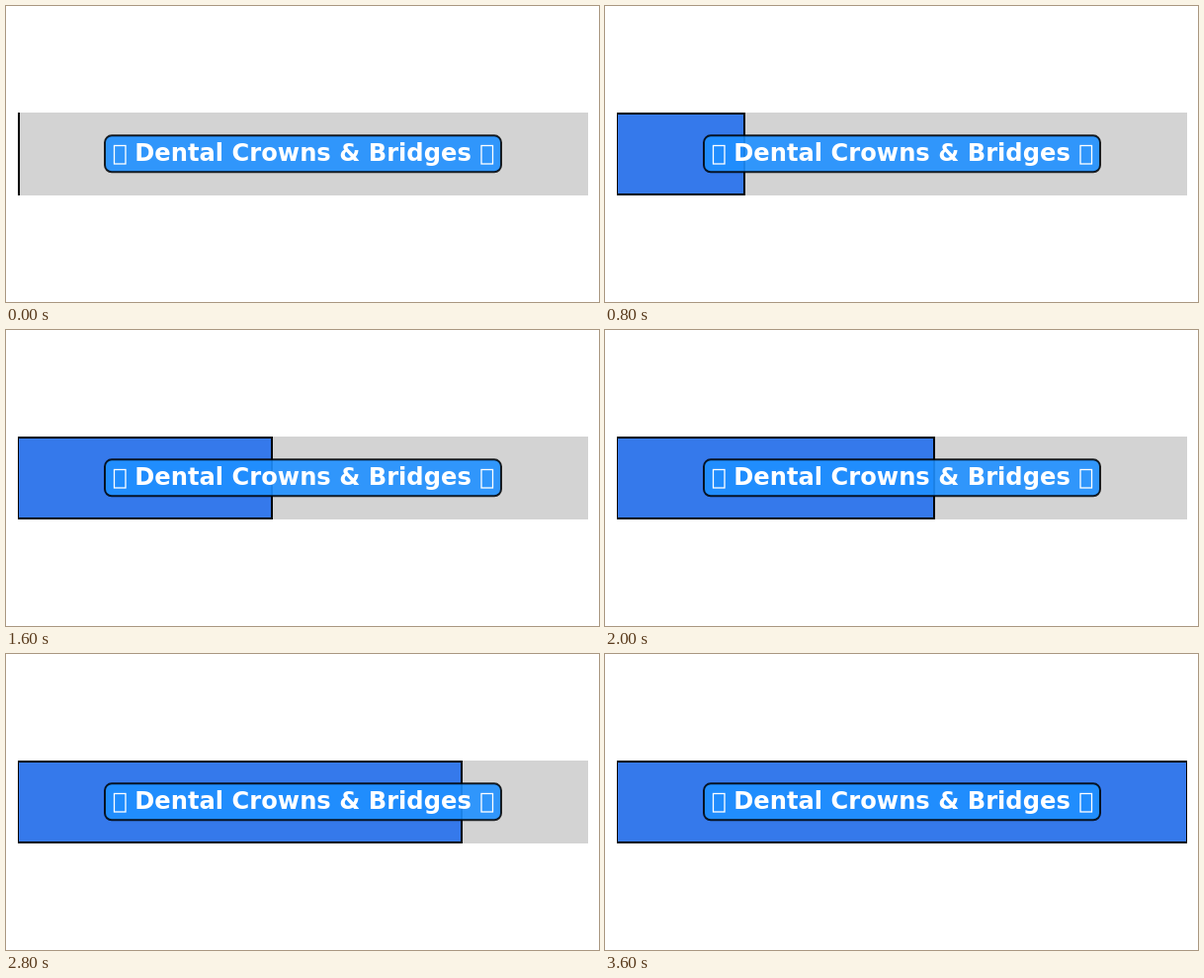
These frames come from a looping animation (600 px wide and 300 px high, 4000 ms). An HTML page:

```html
<!DOCTYPE html>
<html lang="en">
<head>
<meta charset="utf-8">
<title>Dental Crowns &amp; Bridges</title>
<style>
  html, body { margin: 0; width: 100%; height: 100%; overflow: hidden; background: #fff; }
  .stage { position: relative; width: 600px; height: 300px; overflow: hidden; }
  .track {
    position: absolute; left: 12px; top: 108px; width: 577px; height: 84px;
    overflow: hidden; background: #d3d3d3;
  }
  .track::after {
    content: ""; position: absolute; left: 0; top: 0; width: 1px; height: 100%;
    background: #000;
  }
  .bar {
    box-sizing: border-box; width: 578px; height: 84px;
    background: #3579eb; border: solid #000; border-width: 2px 2px 2px 0;
    animation: fill 4s steps(10, end) infinite;
  }
  /* ten holds, 64px apart, from empty to full */
  @keyframes fill {
    from { transform: translateX(-576px); }
    to { transform: translateX(64px); }
  }
  svg { position: absolute; left: 0; top: 0; }
  .plate { fill: #1e90ff; fill-opacity: .9; stroke: #000; stroke-opacity: .85; stroke-width: 2; }
  .glyph { fill: none; stroke: #fff; stroke-width: 1.3; }
  text { font: bold 24.2px "DejaVu Sans", sans-serif; fill: #fff; text-anchor: middle; }
</style>
</head>
<body>
<div class="stage">
  <div class="track"><div class="bar"></div></div>
  <svg width="600" height="300" viewBox="0 0 600 300">
    <rect class="plate" x="100" y="131.3" width="401" height="37" rx="7"/>
    <rect class="glyph" x="109.5" y="141.5" width="11.5" height="18.5"/>
    <text x="300.5" y="157">Dental Crowns &amp; Bridges</text>
    <rect class="glyph" x="481" y="141.5" width="11.5" height="18.5"/>
  </svg>
</div>
</body>
</html>
```
